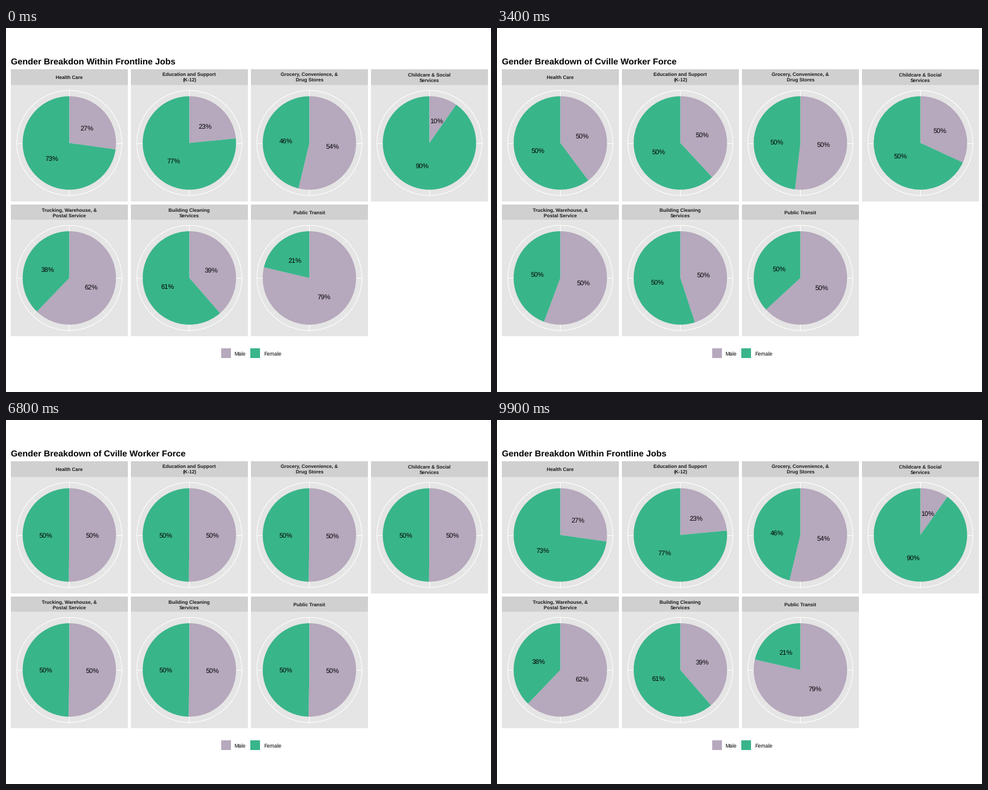
A matplotlib script that plays this animation: 800 by 600 pixels, repeating every 10 s.

```python
import math

import matplotlib.pyplot as plt
from matplotlib.animation import FuncAnimation
from matplotlib.patches import Circle, Rectangle, Wedge

plt.rcParams["font.family"] = "Liberation Sans"
plt.rcParams["text.hinting"] = "none"

DPI = 100
PX = 72 / DPI  # points per pixel
MALE, FEMALE = "#b6a8bd", "#39b58a"
PANEL, STRIP = "#e5e5e5", "#d0d0d0"
RADIUS, RING, LABEL_RADIUS = 77, 86.6, 38.5
COL_STEP, PANEL_W = 198, 192.5
TITLES = ("Gender Breakdon Within Frontline Jobs",
          "Gender Breakdown of Cville Worker Force")
EVEN_SHARE = 0.5025

# Sector name and share of men
SECTORS = [
    ("Health Care", 0.272),
    ("Education and Support\n(K-12)", 0.2345),
    ("Grocery, Convenience, &\nDrug Stores", 0.5375),
    ("Childcare & Social\nServices", 0.097),
    ("Trucking, Warehouse, &\nPostal Service", 0.622),
    ("Building Cleaning\nServices", 0.386),
    ("Public Transit", 0.7865),
]

fig = plt.figure(figsize=(8, 6), dpi=DPI, facecolor="white")
ax = fig.add_axes([0, 0, 1, 1])
ax.set(xlim=(0, 800), ylim=(600, 0))
ax.axis("off")


def text(x, y, s, size, **style):
    return ax.text(x, y, s, fontsize=size * PX, va="baseline", zorder=5, **style)


def rect(x0, y0, x1, y1, color):
    ax.add_patch(Rectangle((x0, y0), x1 - x0, y1 - y0, fc=color, lw=0))


def spokes(cx, cy, start, width):
    for k in range(4):
        a = math.radians(start + 90 * k)
        ax.plot([cx, cx + RING * math.cos(a)], [cy, cy + RING * math.sin(a)],
                color="white", lw=width * PX, solid_capstyle="butt", zorder=2)


class Pie:
    def __init__(self, index, name, share):
        row, col = divmod(index, 4)
        left = 8.2 + COL_STEP * col
        top, split, bottom = ((68, 93.5, 285.5), (291, 316, 508))[row]
        self.share = share
        self.cx, self.cy = left + PANEL_W / 2, (split + bottom) / 2

        rect(left, split, left + PANEL_W, bottom, PANEL)
        rect(left, top, left + PANEL_W, split, STRIP)
        lines = name.split("\n")
        first = top + (16.4 if len(lines) == 1 else 11.8)
        for i, line in enumerate(lines):
            text(self.cx, first + 8.7 * i, line, 8, weight="bold",
                 color="#1a1a1a", ha="center")

        spokes(self.cx, self.cy, 45, 0.53)
        spokes(self.cx, self.cy, 0, 1.07)
        ax.add_patch(Circle((self.cx, self.cy), RING, fill=False, ec="white",
                            lw=1.07 * PX, zorder=2))
        self.male, self.female = (
            ax.add_patch(Wedge((self.cx, self.cy), RADIUS, -90, 270,
                               fc=color, lw=0, zorder=3))
            for color in (MALE, FEMALE))
        self.labels = [text(0, 0, "", 11, ha="center") for _ in range(2)]

    def draw(self, progress):
        share = self.share + (EVEN_SHARE - self.share) * progress
        edge = 360 * share - 90
        self.male.set_theta2(edge)
        self.female.set_theta1(edge)

        shown = 0.5 if progress >= 0.5 else self.share
        percent = round(100 * shown)
        middles = (math.pi * share, math.pi * (1 + share))
        for label, angle, value in zip(self.labels, middles,
                                       (percent, 100 - percent)):
            label.set_text(f"{value}%")
            label.set_position((self.cx + LABEL_RADIUS * math.sin(angle),
                                self.cy - LABEL_RADIUS * math.cos(angle) + 4.6))


pies = [Pie(i, *sector) for i, sector in enumerate(SECTORS)]
title = text(7.6, 60, "", 14.4, weight="bold")

for x, color, name in ((354.6, MALE, "Male"), (403, FEMALE, "Female")):
    rect(x, 528, x + 16, 544.4, color)
    text(x + 21.8, 540, name, 8.8)


def ease(u):
    """Sine ease in and out, held flat outside 0..1."""
    u = min(max(u, 0), 1)
    return round((1 - math.cos(math.pi * u)) / 2, 9)


def update(frame):
    progress = ease((frame - 16) / 34) - ease((frame - 67) / 33)
    title.set_text(TITLES[progress >= 0.5])
    for pie in pies:
        pie.draw(progress)


anim = FuncAnimation(fig, update, frames=100, interval=100,
                     init_func=lambda: update(0), repeat=True, repeat_delay=0)
plt.show()
```
